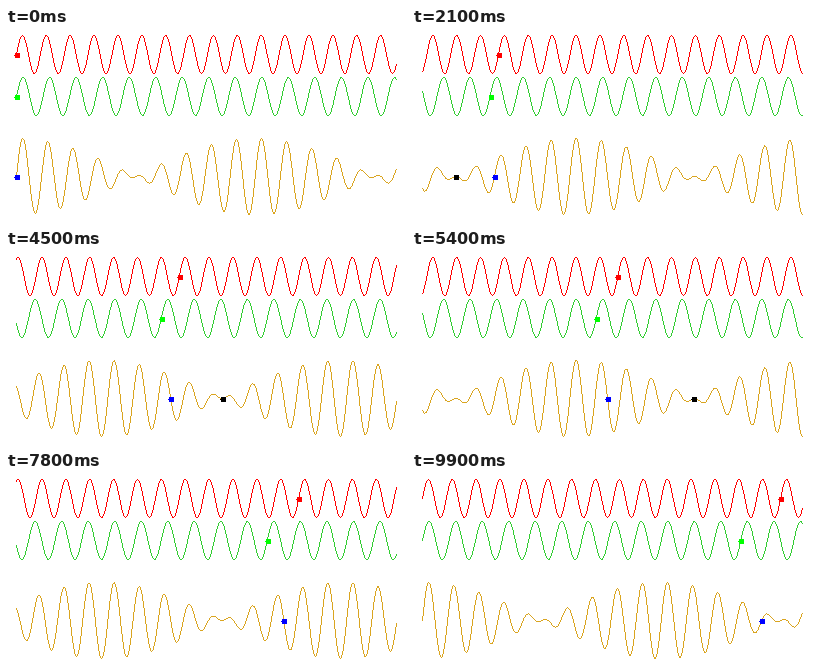
Animation, 400 px wide and 194 px high, one loop 10000 ms. Source, as a matplotlib script:

```python
import numpy as np
import matplotlib.pyplot as plt
from matplotlib.animation import FuncAnimation
from matplotlib.patches import Rectangle

W, H, DPI = 400, 194, 100
FRAMES, INTERVAL = 100, 100
LEFT, SCALE_X, SCALE_Y = 10, 3.8, 19.04
DT = 10 * np.pi / 33          # both waves repeat after 33 steps
K1, W1 = 1.0, 1.0
K2, W2 = 0.9, 0.8
GROUP_SPEED = (W1 - W2) / (K1 - K2)
NODE_START = -np.pi / (K1 - K2)
ROWS = (26, 68, 148)

fig = plt.figure(figsize=(W / DPI, H / DPI), dpi=DPI, facecolor="white")
ax = fig.add_axes([0, 0, 1, 1])

# samples at every half pixel: column edges and column centres
cols = np.arange(381)
u = np.clip(np.arange(-0.5, 381, 0.5) / SCALE_X, 0, 100)
edges = LEFT + np.arange(382)


class Wave:
    """One-pixel curve, drawn as the run of pixels it crosses per column."""

    def __init__(self, row, color):
        self.row = row
        flat = np.full(len(cols), float(row))
        self.patch = ax.stairs(flat + 1, edges, baseline=flat, fill=True,
                               color=color, lw=0, antialiased=False,
                               snap=False)

    def show(self, height):
        y = self.row - SCALE_Y * height
        start, mid, end = y[:-2:2], np.round(y[1::2]), y[2::2]
        top = np.minimum(np.ceil(np.minimum(start, end)), mid)
        bottom = np.maximum(np.floor(np.maximum(start, end)), mid)
        self.patch.set_data(bottom + 1, edges, top)


class Marker:
    """Small square dot with a one-pixel nub on its left side."""

    def __init__(self, row, speed, color, start=0.0):
        self.y = row + 1
        self.speed, self.start = speed, start
        style = dict(facecolor=color, lw=0, antialiased=False, zorder=3)
        self.body = ax.add_patch(Rectangle((0, self.y - 2), 5, 5, **style))
        self.nub = ax.add_patch(Rectangle((0, self.y), 1, 1, **style))

    def move(self, t):
        pos = self.start + self.speed * t
        visible = 0 <= pos <= 100
        x = LEFT + 1 + SCALE_X * pos
        cell = int(np.floor(x + 0.5))
        self.body.set_x(cell - 2)
        self.nub.set_x(cell - 3)
        self.body.set_visible(visible)
        self.nub.set_visible(visible and abs(x - cell) < 0.4)


waves = [Wave(r, c) for r, c in zip(ROWS, ("red", "limegreen", "goldenrod"))]
markers = [
    Marker(ROWS[0], W1 / K1, "red"),
    Marker(ROWS[1], W2 / K2, "lime"),
    Marker(ROWS[2], (W1 + W2) / (K1 + K2), "blue"),
    Marker(ROWS[2], GROUP_SPEED, "black", NODE_START),
]
ax.set_xlim(0, W)
ax.set_ylim(H, 0)
ax.axis("off")


def update(i):
    t = i * DT
    a = np.sin(K1 * u - W1 * t)
    b = np.sin(K2 * u - W2 * t)
    for wave, height in zip(waves, (a, b, a + b)):
        wave.show(height)
    for marker in markers:
        marker.move(t)
    return []


anim = FuncAnimation(fig, update, frames=FRAMES, interval=INTERVAL,
                     repeat=True, repeat_delay=0, blit=False)
plt.show()
```
